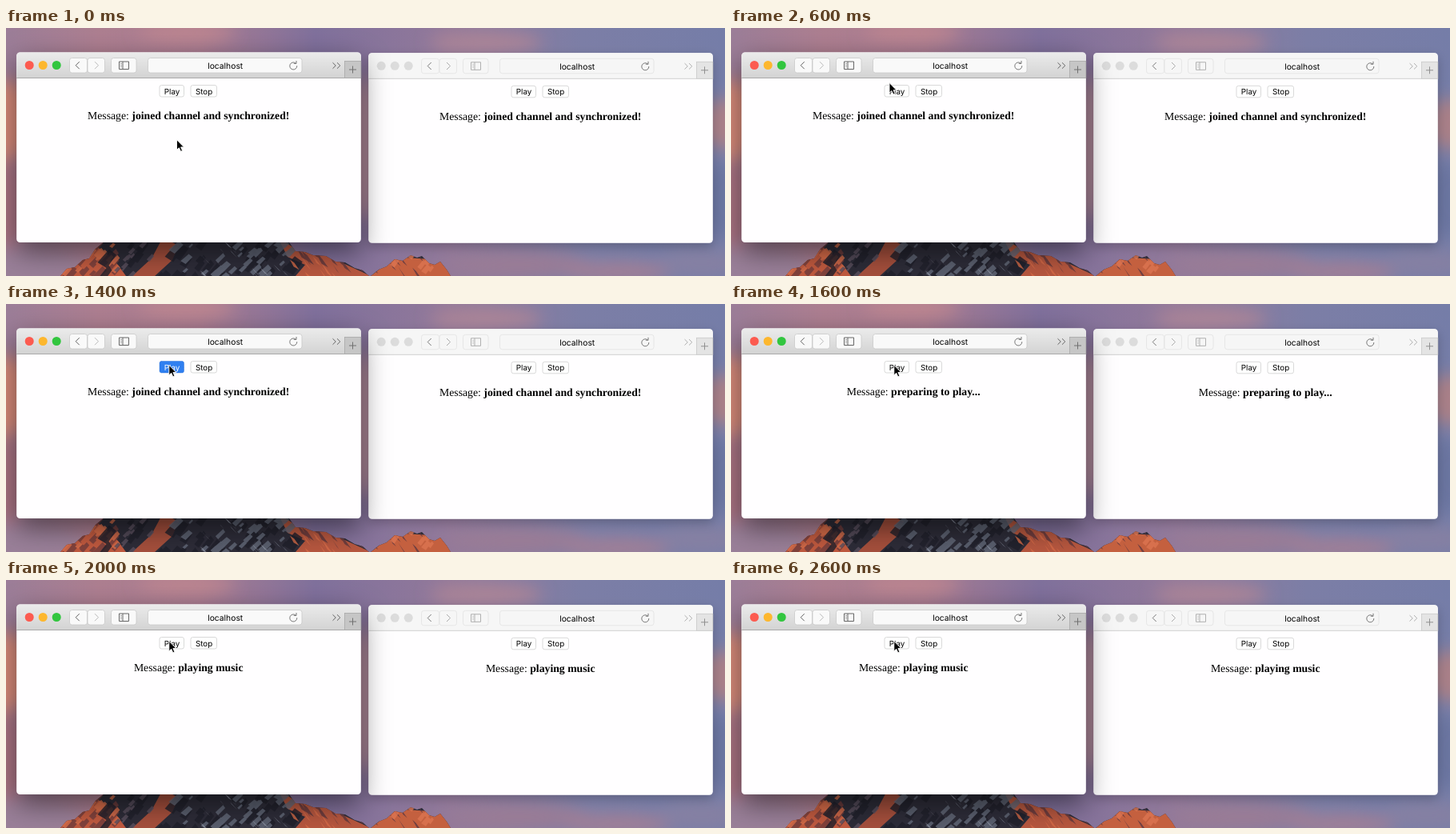
An HTML page for the animation above (2700 ms loop, 899 px wide and 310 px high).

```html
<!DOCTYPE html>
<html lang="en">
<head>
<meta charset="utf-8">
<title>Synchronized players</title>
<style>
  html, body { margin: 0; width: 100%; height: 100%; overflow: hidden; }
  svg { display: block; width: 899px; height: 310px; }
  text { text-anchor: middle; text-rendering: geometricPrecision; }
  .ui { font: 10.3px Inter, sans-serif; }
  .button text { font-size: 9.8px; }
  .message { font: 13.74px "Liberation Serif", serif; }
  .message tspan { font-weight: bold; }
  .icon { fill: none; stroke-width: 1; }
  .button rect { fill: #fff; stroke: #d0d0d0; stroke-width: .8; }
  .pressed rect { fill: #2f7ff0; stroke: #1c62cf; stroke-dasharray: 1 1; }
  .pressed text { fill: #fff; }
</style>
</head>
<body>
<svg id="stage" viewBox="0 0 899 310">
  <defs>
    <linearGradient id="sky">
      <stop offset="0" stop-color="#9b7d98"/>
      <stop offset=".13" stop-color="#ad7e90"/>
      <stop offset=".27" stop-color="#a97c92"/>
      <stop offset=".43" stop-color="#80709c"/>
      <stop offset=".62" stop-color="#92799a"/>
      <stop offset=".8" stop-color="#7c7ea6"/>
      <stop offset="1" stop-color="#757da8"/>
    </linearGradient>
    <linearGradient id="bar" x2="0" y2="1">
      <stop stop-color="#ebebeb"/><stop offset="1" stop-color="#d3d3d3"/>
    </linearGradient>
    <filter id="soft" x="-60%" y="-60%" width="220%" height="220%"><feGaussianBlur stdDeviation="10"/></filter>
    <filter id="active" x="-20%" y="-30%" width="140%" height="170%">
      <feDropShadow dx="0" dy="12" stdDeviation="17" flood-opacity=".5"/>
    </filter>
    <filter id="idle" x="-20%" y="-30%" width="140%" height="170%">
      <feDropShadow dx="0" dy="5" stdDeviation="7" flood-opacity=".22"/>
    </filter>
    <clipPath id="ridge">
      <path d="M68 310L76 301 86 299 96 290 104 288 112 276 124 266 140 258H340L354 268 362 279 374 280 384 284 400 285 412 292 424 293 436 300 446 303 454 310Z
        M456 310L466 302 476 298 486 289 496 291 506 284 514 287 520 285 529 294 536 296 543 292 551 302 556 310Z"/>
    </clipPath>
  </defs>
  <rect width="899" height="310" fill="url(#sky)"/>
  <g id="clouds" filter="url(#soft)"></g>
  <g id="mountain" clip-path="url(#ridge)"></g>
  <g id="windows"></g>
  <path id="cursor" d="M0 0V12.6L2.9 10 5 14.6 7.1 13.7 5.1 9.2H9Z" stroke="#fff" stroke-width=".9"/>
</svg>
<script>
const $ = id => document.getElementById(id);
const LOOP = 2700, STEP = 100;

const clouds = [
  [0, 115, 35, 50, '#da8c7c'], [0, 220, 30, 55, '#ac7484'], [25, 300, 75, 22, '#9a8099'],
  [225, 6, 60, 12, '#bd8690'], [600, 18, 70, 13, '#ab8496'], [899, 120, 30, 32, '#a98088'],
  [899, 215, 32, 45, '#6a74a0'], [640, 296, 90, 16, '#9a7c95'], [765, 305, 70, 12, '#a37f95'],
  [870, 294, 55, 18, '#8580a3'], [448, 150, 20, 90, '#b0899a']
];
$('clouds').innerHTML = clouds.map(([x, y, rx, ry, fill]) =>
  `<ellipse cx="${x}" cy="${y}" rx="${rx}" ry="${ry}" fill="${fill}"/>`).join('');

let seed = 11;
const random = () => (seed = seed * 16807 % 2147483647) / 2147483647;

// Scatters slivers that run down the slope, lean being the sideways drift.
function slivers(count, from, to, colour, length, lean) {
  let d = '';
  for (let i = 0; i < count; i++) {
    const x = from + random() * (to - from), y = 262 + random() * 44;
    const h = length * (.5 + random()), w = h * (.2 + random() * .25);
    d += `M${x} ${y}l${w} ${h * .3} ${h * lean} ${h * .7} ${-w * 1.3} ${-h * .3}z`;
  }
  return `<path d="${d}" fill="${colour}" fill-opacity=".8"/>`;
}
const plane = (points, fill) => `<path d="M${points}Z" fill="${fill}"/>`;
$('mountain').innerHTML =
  plane('60 250H570V310H60', '#2d2c38') +
  plane('60 310L112 272 128 284 140 296 150 310', '#c15a3f') +
  plane('196 262L216 272 208 290 186 310H158L182 288', '#a54f3c') +
  plane('340 262L362 276 400 284 456 310H362L374 296 352 286', '#b7573f') +
  plane('456 310L486 286 545 290 560 310', '#c4603f') +
  slivers(22, 72, 140, '#733d3b', 13, -.6) + slivers(12, 72, 140, '#dc704a', 10, -.6) +
  slivers(40, 125, 365, '#20202b', 16, -.5) + slivers(34, 215, 360, '#666c7c', 11, -.7) +
  slivers(12, 235, 350, '#9399a8', 8, .7) + slivers(10, 130, 185, '#5c5060', 10, -.6) +
  slivers(22, 355, 450, '#60383c', 13, .5) + slivers(14, 350, 445, '#d96c48', 12, .5) +
  slivers(18, 465, 555, '#603940', 12, .5) + slivers(12, 460, 545, '#dd7550', 11, -.5);

const box = (x, y, w, h, fill, stroke, r = 3) =>
  `<rect x="${x}" y="${y}" width="${w}" height="${h}" rx="${r}" fill="${fill}" stroke="${stroke}" stroke-width=".8"/>`;
const icon = (d, stroke) => `<path class="icon" d="${d}" stroke="${stroke}"/>`;
const button = (x, w, label) =>
  `<g class="button"><rect x="${x}" y="71.5" width="${w}" height="14.5" rx="2.5"/>
   <text class="ui" x="${x + w / 2 + .3}" y="82.6">${label}</text></g>`;

function browser(dx, dy, active) {
  const edge = active ? '#cacaca' : '#e2e2e2';
  const face = active ? '#f9f9f9' : '#f6f6f6';
  const ink = active ? '#666' : '#b0b0b0';
  const lights = active ? ['#fc5b50', '#fdb72e', '#32c63f'] : Array(3).fill('#dcdcdc');
  return `<g transform="translate(${dx} ${dy})">
    <rect x="13.2" y="30.5" width="430.6" height="237.5" rx="4.5" fill="#fffeff" filter="url(#${active ? 'active' : 'idle'})"/>
    <path d="M13.2 62.5V35Q13.2 30.5 17.7 30.5H439.3Q443.8 30.5 443.8 35V62.5Z" fill="${active ? 'url(#bar)' : '#f6f6f6'}"/>
    ${lights.map((c, i) => `<circle cx="${29.2 + 17 * i}" cy="46.5" r="5.5" fill="${c}"/>`).join('')}
    ${box(79.5, 37.5, 22, 18.5, face, edge)}${box(102, 37.5, 21.5, 18.5, face, edge)}
    ${box(131.5, 37.5, 31.5, 18.5, face, edge)}${box(177.5, 37.5, 192.5, 18.5, face, edge)}
    ${icon('M91.7 42.2L87.2 46.7 91.7 51.2', active ? '#606060' : '#777')}
    ${icon('M111 42.2L115.5 46.7 111 51.2', active ? '#b9b9b9' : '#aaa')}
    ${icon('M141.5 42H153.5V51.5H141.5ZM146 42V51.5', ink)}
    ${icon('M143 44.5H145M143 46.5H145M143 48.5H145', active ? '#aaa' : '#ccc')}
    ${icon('M362.4 44.2A4.5 4.5 0 1 0 363.8 47.2M359.8 44.4H363V41', '#777')}
    ${icon('M408.5 43.3L412.3 47 408.5 50.7M414 43.3L417.8 47 414 50.7', ink)}
    ${box(423.5, 41.5, 20.3, 21, active ? '#c6c6c6' : '#e4e4e4', active ? '#a9a9a9' : '#c9c9c9', 0)}
    ${icon('M429 52H438M433.5 47.5V56.5', active ? '#707070' : '#909090')}
    <path d="M13.2 62.5H443.8" stroke="${active ? '#aaa' : '#d0d0d0'}"/>
    <text class="ui" x="274.2" y="50.8">localhost</text>
    ${button(192, 30.5, 'Play')}${button(231, 32.5, 'Stop')}
    <text class="message" x="228.2" y="114.3">Message: <tspan></tspan></text>
  </g>`;
}
$('windows').innerHTML = browser(440, .8, false) + browser(0, 0, true);

const messages = document.querySelectorAll('.message tspan');
const play = document.querySelectorAll('.button')[2];
const path = [[0, 213.5, 139.7], [600, 198, 68.5], [1000, 203.8, 76.3], [LOOP, 203.8, 76.3]];

function pointer(t) {
  const i = path.findIndex(p => p[0] > t);
  const [t0, x0, y0] = path[i - 1], [t1, x1, y1] = path[i];
  const u = (t - t0) / (t1 - t0), k = u * u * (3 - 2 * u);
  return [x0 + (x1 - x0) * k, y0 + (y1 - y0) * k];
}

function draw(now) {
  const t = Math.floor(now % LOOP / STEP) * STEP;
  const message = t < 1500 ? 'joined channel and synchronized!' : t < 1900 ? 'preparing to play...' : 'playing music';
  messages.forEach(m => { m.textContent = message; });
  play.classList.toggle('pressed', t >= 1300 && t < 1500);
  $('cursor').setAttribute('transform', `translate(${pointer(t)})`);
  requestAnimationFrame(draw);
}
draw(0);
</script>
</body>
</html>
```
